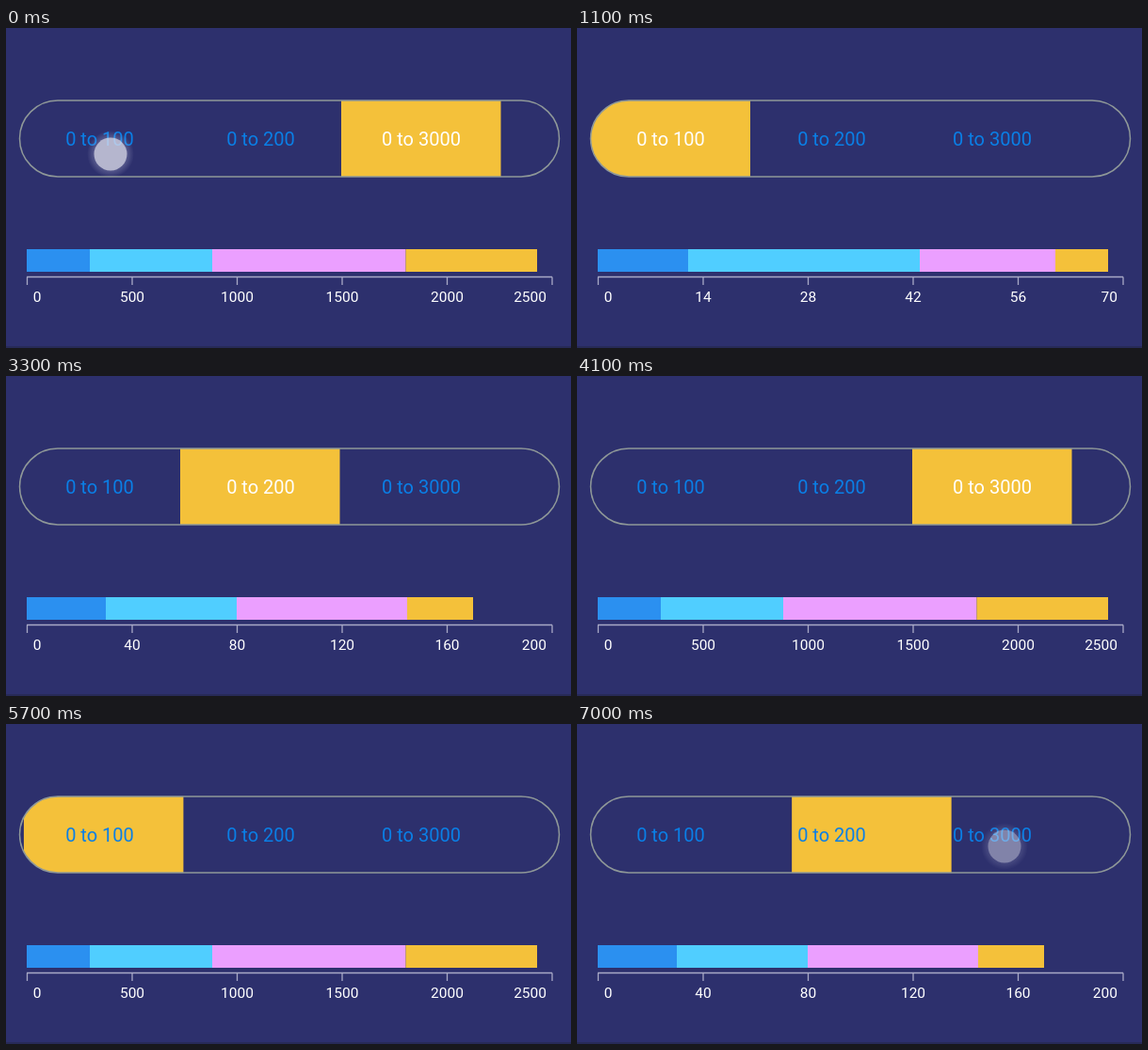
An HTML page for the animation above (7.1 s loop, 600x340 px).

```html
<!DOCTYPE html>
<html lang="en">
<head>
<meta charset="utf-8">
<title>Range switch</title>
<style>
  html, body { margin: 0; width: 100%; height: 100%; overflow: hidden; background: #2d306d; }
  svg { display: block; width: 100%; height: 100%; }
  text { font-family: Roboto, Arial, sans-serif; }
  .tab { font-size: 20px; text-anchor: middle; }
  .label { font-size: 15.5px; fill: #fff; text-anchor: middle; }
</style>
</head>
<body>
<svg id="stage" viewBox="0 0 600 340">
  <defs>
    <clipPath id="pill"><rect x="14.5" y="77" width="573" height="81" rx="40.5"/></clipPath>
    <radialGradient id="halo">
      <stop offset="0.65" stop-color="#d8d8ee" stop-opacity="0.36"/>
      <stop offset="1" stop-color="#d8d8ee" stop-opacity="0"/>
    </radialGradient>
  </defs>
  <rect y="338" width="600" height="2" fill="#272a58"/>
  <g clip-path="url(#pill)"><rect id="thumb" y="77" width="169.5" height="81" fill="#f4c13a"/></g>
  <rect x="14.5" y="77" width="573" height="81" rx="40.5" fill="none" stroke="#8f9898" stroke-width="1.5"/>
  <g id="tabs"></g>
  <g id="bars"></g>
  <path id="axis" fill="none" stroke="#a8a9c6" stroke-width="1.3"/>
  <g id="labels"></g>
  <g id="touch">
    <circle r="25" fill="url(#halo)"/>
    <circle r="17.5" fill="#dcdcea"/>
  </g>
</svg>
<script>
const LOOP = 7100, STEP = 100, SLIDE = 400, FADE = 350;
const COLORS = ['#2b90f0', '#50ceff', '#eb9fff', '#f4c13a'];
const TICKS = [22.5, 134, 245.5, 357, 468.5, 580];

const ranges = [
  { name: '0 to 100', mid: 99.5, x: 14.5, step: 14, edges: [22, 118, 364, 508, 564], tap: [111, 134] },
  { name: '0 to 200', mid: 270.5, x: 185, step: 40, edges: [22, 106, 245, 426, 496], tap: [320.5, 131] },
  { name: '0 to 3000', mid: 441, x: 356, step: 500, edges: [22, 89, 219, 424.5, 564], tap: [454, 130] }
];

// press time, slide start, from, to
const moves = [
  [-200, 90, 2, 0],
  [2080, 2368, 0, 1],
  [3310, 3450, 1, 2],
  [5200, 5329, 2, 0],
  [5960, 6130, 0, 1],
  [6690, 6866, 1, 2]
];

const $ = id => document.getElementById(id);
const clamp = v => Math.max(0, Math.min(1, v));
const ease = p => (1 - Math.cos(Math.PI * p)) / 2;

function add(parent, tag, attrs, text = '') {
  const el = document.createElementNS('http://www.w3.org/2000/svg', tag);
  for (const key in attrs) el.setAttribute(key, attrs[key]);
  el.textContent = text;
  return $(parent).appendChild(el);
}

const tabs = ranges.map(r => add('tabs', 'text', { class: 'tab', x: r.mid, y: 124.6 }, r.name));
const bars = COLORS.map(fill => add('bars', 'rect', { y: 235, height: 24, fill }));
const labels = TICKS.map((x, i) => {
  const el = add('labels', 'text', { class: 'label', x, y: 291.2 });
  if (i === 0) el.setAttribute('x', 33);
  if (i === 5) {
    el.setAttribute('x', 574);
    el.style.textAnchor = 'end';
  }
  return el;
});
$('axis').setAttribute('d', 'M22 264.5H580' + TICKS.map(x => `M${x} 264.5V273`).join(''));

let shown = -1;
function showChart(index) {
  if (index === shown) return;
  shown = index;
  const { edges, step } = ranges[index];
  bars.forEach((bar, i) => {
    bar.setAttribute('x', edges[i]);
    bar.setAttribute('width', edges[i + 1] - edges[i]);
  });
  labels.forEach((el, i) => { el.textContent = i * step; });
}

function draw(t) {
  const [press, start, from, to] = moves.filter(m => m[0] <= t).pop();
  const p = clamp((t - start) / SLIDE);
  const a = ranges[from], b = ranges[to];
  $('thumb').setAttribute('x', a.x + (b.x - a.x) * ease(p));

  // a tab is highlighted only while the thumb rests on it
  const active = t < start ? from : p === 1 ? to : -1;
  tabs.forEach((el, i) => el.setAttribute('fill', i === active ? '#fff' : '#0a7fe6'));
  showChart(p === 1 ? to : from);

  const alpha = 0.78 * clamp((t - press) / 100) * (1 - clamp((t - start) / FADE));
  $('touch').setAttribute('transform', `translate(${b.tap})`);
  $('touch').setAttribute('opacity', alpha);
}

const origin = performance.now();
function tick() {
  const t = (performance.now() - origin) % LOOP;
  draw(Math.floor(t / STEP) * STEP);
  requestAnimationFrame(tick);
}
tick();
</script>
</body>
</html>
```
